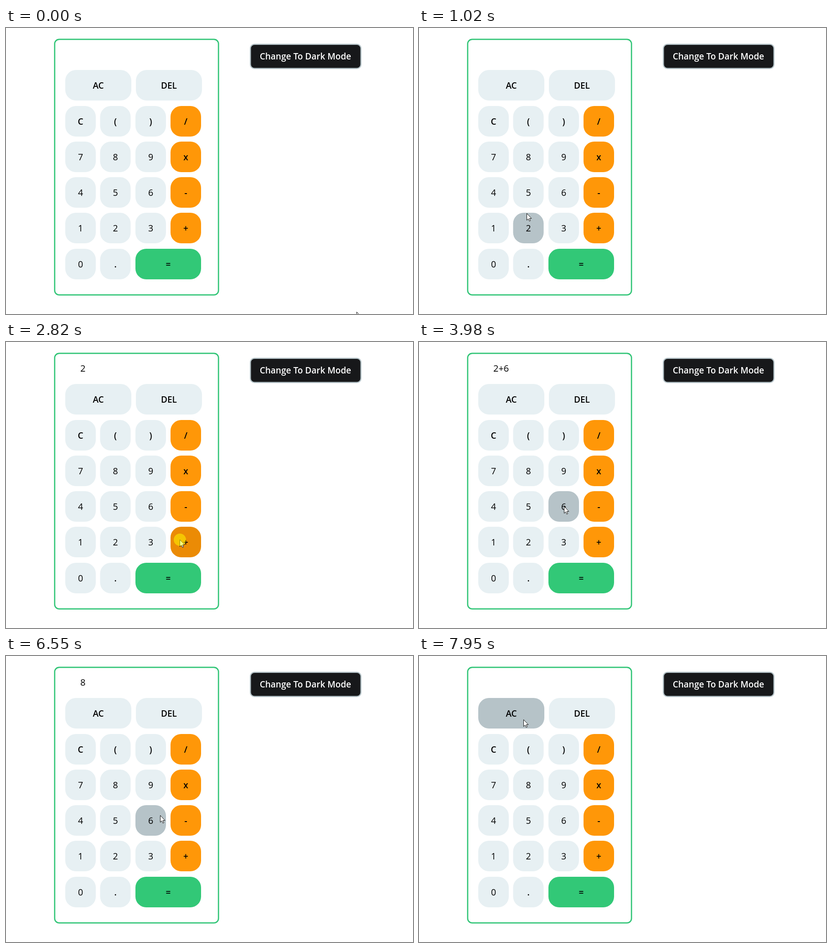
Recreate the animation shown at these times as an HTML page. Size 893x627 px, loop 8 s.

```html
<!DOCTYPE html>
<html lang="en">
<head>
<meta charset="utf-8">
<title>Calculator</title>
<style>
  html, body { margin: 0; width: 100%; height: 100%; overflow: hidden; background: #fff; }
  svg { display: block; width: 893px; height: 627px; }
  text { font: 600 19px "Open Sans", "Noto Sans", sans-serif; text-anchor: middle; }
  .digit { font-weight: 500; font-size: 19.5px; }
  #display { font-weight: 500; font-size: 20px; text-anchor: start; }
</style>
</head>
<body>
<svg id="stage" viewBox="0 0 893 627">
  <rect x="106.8" y="24.8" width="359.4" height="560.4" rx="10" fill="#fff" stroke="#32c577" stroke-width="2.7"/>
  <rect x="536.2" y="35.7" width="242.6" height="53" rx="9" fill="#17181a" stroke="#b5c3c8" stroke-width="2.5"/>
  <text x="657" y="69" fill="#fff">Change To Dark Mode</text>
  <text id="display" x="163" y="65"></text>
  <g id="keys"></g>
  <path id="cursor" d="M0 0V15L3.4 11.9L5.7 17L8 16L5.8 11H10.4Z" fill="#fff" stroke="#111" stroke-linejoin="round"/>
  <circle id="press" r="13.5" fill="#ff0" opacity=".5"/>
</svg>
<script>
const LOOP = 8000;
const $ = id => document.getElementById(id);

// Normal and hover fill of each kind of key
const FILLS = {
  plain: ['#e7f0f3', '#b6c3c8'],
  operator: ['#ff9708', '#eb8b05'],
  equals: ['#32c877', '#2bad66']
};

function add(tag, attrs, label) {
  const el = document.createElementNS('http://www.w3.org/2000/svg', tag);
  for (const name in attrs) el.setAttribute(name, attrs[name]);
  if (label) el.textContent = label;
  $('keys').append(el);
  return el;
}

const keys = [];
function addKey(label, x, y, w, kind) {
  const h = 67;
  const rect = add('rect', { x, y, width: w, height: h, rx: 23.5 });
  add('text', { x: x + w / 2, y: y + 40.5, class: /\d/.test(label) ? 'digit' : '' }, label);
  keys.push({ rect, x, y, w, h, fills: FILLS[kind] });
}

const COLUMNS = [130, 206.5, 284, 361];
addKey('AC', 130, 92, 145, 'plain');
addKey('DEL', 285, 92, 145, 'plain');
['C()/', '789x', '456-', '123+', '0.='].forEach((row, r) => {
  const y = 171 + Math.floor(78.25 * r);
  [...row].forEach((label, c) => {
    const kind = label === '=' ? 'equals' : c === 3 ? 'operator' : 'plain';
    addKey(label, COLUMNS[c], y, label === '=' ? 144 : 67, kind);
  });
});

// Each move: first and last step time, number of steps, points on the way
const START = [769, 622];
const MOVES = [
  [70, 160, 3, [[419, 466]]],
  [320, 1100, 11, [[388, 449], [338, 421], [282, 395], [230, 375], [193, 365], [178, 363],
    [183, 367], [201, 377], [222, 391], [236, 406], [241, 419]]],
  [1180, 1260, 2, [[241, 426]]],
  [1960, 2590, 9, [[381, 433]]],
  [3290, 3670, 6, [[318, 360]]],
  [4440, 5080, 9, [[344, 506]]],
  [6170, 6550, 6, [[338, 349]]],
  [6780, 7170, 6, [[255, 205]]],
  [7400, 7790, 6, [[229, 139]]]
];

// Press, release and what the display then reads
const CLICKS = [
  [1400, 1490, '2'],
  [2820, 2980, '2+'],
  [3890, 3980, '2+6'],
  [5230, 5310, '8'],
  [7870, 7950, '']
];

const smooth = u => u * u * (3 - 2 * u);

function along(points, u) {
  const s = u * (points.length - 1);
  const i = Math.min(Math.floor(s), points.length - 2);
  return points[i].map((a, k) => a + (points[i + 1][k] - a) * (s - i));
}

function cursorAt(t) {
  let at = START;
  for (const [from, to, steps, points] of MOVES) {
    if (t < from) break;
    const gap = (to - from) / (steps - 1);
    const done = Math.min(steps, Math.floor((t - from) / gap + 0.02) + 1) / steps;
    at = along([at, ...points], points.length > 1 ? done : smooth(done));
  }
  return at.map(Math.round);
}

function draw(t) {
  const [x, y] = cursorAt(t);
  $('cursor').setAttribute('transform', `translate(${x + 0.5} ${y + 0.5})`);

  for (const { rect, x: left, y: top, w, h, fills } of keys) {
    const over = x >= left && x < left + w && y >= top && y < top + h;
    rect.setAttribute('fill', fills[+over]);
  }

  let shown = '', pressed = false;
  for (const [down, up, result] of CLICKS) {
    if (t >= down && t < up) pressed = true;
    if (t >= up) shown = result;
  }
  $('display').textContent = shown;
  $('press').setAttribute('transform', `translate(${x + 0.5} ${y + 0.5})`);
  $('press').setAttribute('visibility', pressed ? 'visible' : 'hidden');
}

const began = performance.now();
function tick() {
  draw((performance.now() - began) % LOOP);
  requestAnimationFrame(tick);
}
tick();
</script>
</body>
</html>
```
